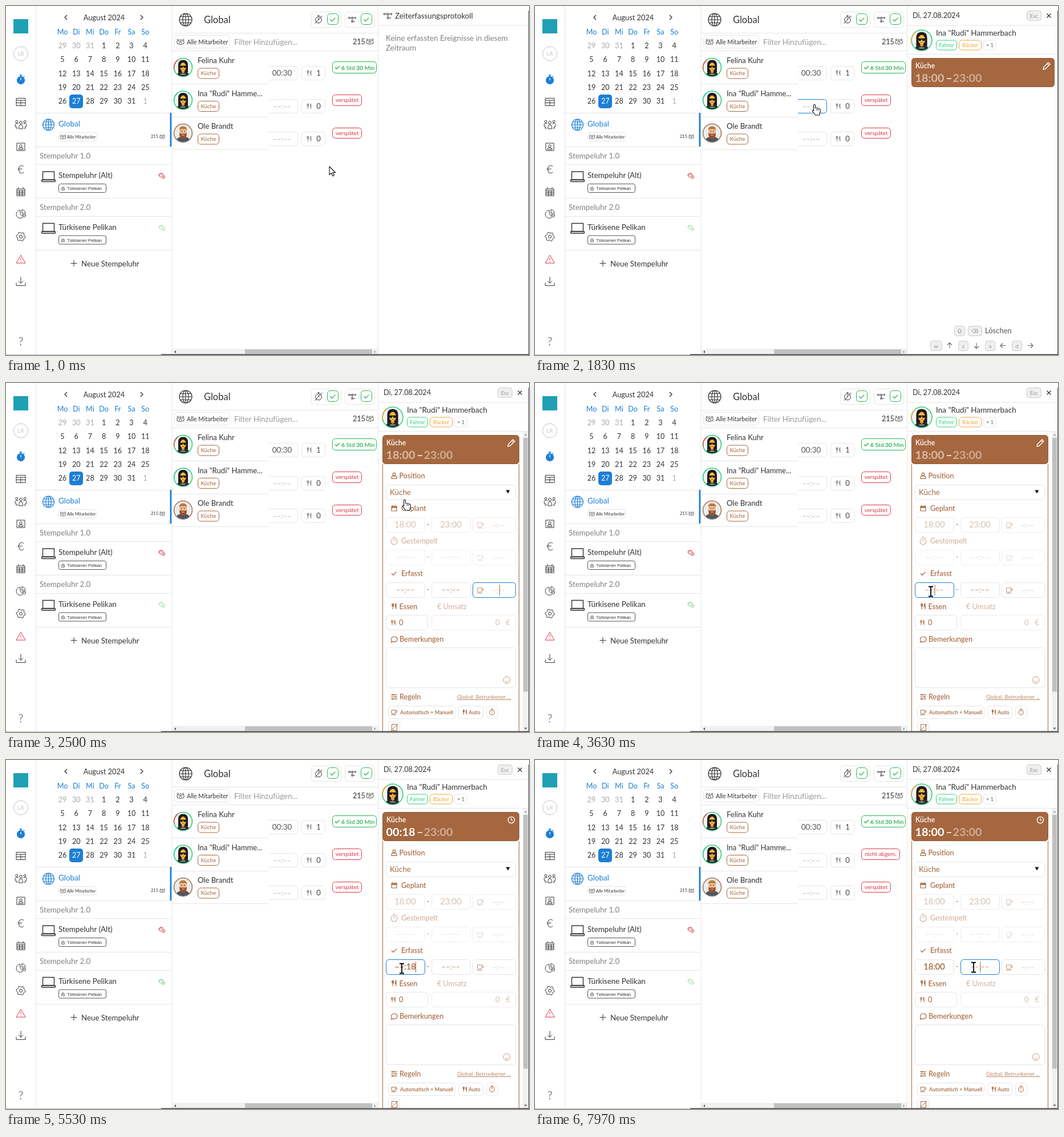
An HTML page for the animation above (8 s loop, 917 by 611 pixels).

```html
<!DOCTYPE html>
<html lang="de">
<head>
<meta charset="utf-8">
<title>Zeiterfassung</title>
<style>
html, body { margin: 0; width: 100%; height: 100%; overflow: hidden; background: #fff; }
svg { display: block; }
text { font-family: Lato, "Open Sans", sans-serif; white-space: pre; }
.arial { font-family: "Liberation Sans", Arial, sans-serif; }
</style>
</head>
<body>
<svg id="stage" width="917" height="611" viewBox="0 0 917 611"><g id="base"></g><g id="live"></g></svg>
<script>
const INK = '#333', GRAY = '#808080', LINE = '#e6e6e6', BLUE = '#1c7fd6', RED = '#dc3545',
      GREEN = '#28b351', BROWN = '#a5673f', PALE = '#d9c1b1', SOFT = '#f0ece9';

// drawing helpers, all returning SVG markup
const text = (x, y, s, size = 13.3, fill = INK, anchor = 'start', weight = 400, extra = '') =>
  `<text x="${x}" y="${y}" font-size="${size}" fill="${fill}" text-anchor="${anchor}" font-weight="${weight}" ${extra}>${s}</text>`;
const mid = (x, y, s, size, fill, weight) => text(x, y, s, size, fill, 'middle', weight);
const box = (x, y, w, h, r = 5, stroke = LINE, fill = 'none') =>
  `<rect x="${x + .5}" y="${y + .5}" width="${w - 1}" height="${h - 1}" rx="${r}" stroke="${stroke}" fill="${fill}"/>`;
const fillBox = (x, y, w, h, fill, r = 0) => `<rect x="${x}" y="${y}" width="${w}" height="${h}" rx="${r}" fill="${fill}"/>`;
const hline = (x, y, w) => fillBox(x, y, w, 1, LINE);
const path = (d, stroke = INK, w = 1, fill = 'none') =>
  `<path d="${d}" stroke="${stroke}" stroke-width="${w}" fill="${fill}" stroke-linejoin="round" vector-effect="non-scaling-stroke"/>`;
const shape = (d, fill) => `<path d="${d}" fill="${fill}"/>`;
const at = (x, y, s, inner) => `<g transform="translate(${x} ${y}) scale(${s})">${inner}</g>`;
const fade = (o, inner) => `<g opacity="${o}">${inner}</g>`;
const ring = (x, y, r, ry = r) => `M${x - r} ${y}a${r} ${ry} 0 1 0 ${2 * r} 0a${r} ${ry} 0 1 0 ${-2 * r} 0`;

const gear = 'M' + [...Array(24)].map((_, i) => {
  const a = i * Math.PI / 12, r = i % 4 < 2 ? 8 : 6.2;
  return (r * Math.cos(a)).toFixed(1) + ' ' + (r * Math.sin(a)).toFixed(1);
}).join('L') + 'z';
const watch = ring(0, 1, 6) + 'M0 1v-3.5M-2-7.5h4M0-7.5v2.5M4.5-4.5l1.5-1.5';
const icons = {
  gear: gear + ring(0, 0, 2.6), watch, noWatch: watch + 'M-7 8L7-7',
  people: ring(0, -3, 2.2) + 'M-2.8 7v-4q0-2.5 2.8-2.5t2.8 2.5v4z' + ring(-6.5, -4.5, 1.8) + ring(6.5, -4.5, 1.8) +
    'M-4-1q-5-2.5-5 2v2h1.5v3h3M4-1q5-2.5 5 2v2h-1.5v3h-3',
  table: 'M-8-6.5h16v13h-16zM-8-3h16M-8 1.5h16M0-3v9.5',
  card: 'M-7-6.5h14v13h-14z' + ring(0, -1.5, 2.2) + 'M-4 4.5q0-3.3 4-3.3t4 3.3z',
  calendar: 'M-7-5h14v12h-14zM-7-2h14M-7 1h14M-7 4h14M-2.5-2v9M2.5-2v9M-4-8v3M4-8v3',
  day: 'M-5-4h10v9h-10zM-5-2.5h10M-5-1.5h10M-3-6v2M3-6v2',
  pie: 'M-1-7a7 7 0 1 0 5 12L-1 0zM2-8a6.5 6.5 0 0 1 6 6.5h-6zM2.5 1h6q0 3-2 4.5z',
  warn: 'M0-7L8 7h-16zM0-2v4M0 4v1.2',
  load: 'M0-8v11M-4-1l4 4 4-4M-8 2v5h16v-5',
  globe: ring(0, 0, 10) + ring(0, 0, 4.6, 10) + 'M-10 0h20M-8.5-5h17M-8.5 5h17M0-10v20',
  fork: 'M-4-5.5v3.5q0 2 1.5 2t1.5-2v-3.5M-2.5-5.5v11M4 5.5v-11q-2 1-2 6.5h2',
  cup: 'M-5-4h9v5q0 3-3 3h-3q-3 0-3-3zM4-3h1.5q1.5 0 1.5 2t-1.5 2h-1.5M-6 6h11',
  pencil: 'M-6 6l1-4 8-8 3 3-8 8zM1-4l3 3',
  clock: ring(0, 0, 5.6) + 'M0-3.5v3.5l2.5 1.5',
  user: ring(0, -3, 2.6) + 'M-5 5.5v-1q0-4 3-4h4q3 0 3 4v1z',
  check: 'M-5 0l3.3 3.3 6.5-6.5',
  chat: 'M-6 6l1.5-3a6 5 0 1 1 3 1.8z',
  sliders: 'M-6-4h12M-6 0h12M-6 4h12M-2-6v4M3-2v4M-3 2v4',
  flow: ring(-6, -3, 1.5) + ring(0, -3, 1.5) + ring(0, 4, 1.5) + 'M-4.5-3h3M1.5-3h6M5.5-5l2 2-2 2M0-1.5v4M1.5 4h4',
  plug: 'M-6-1h2M-4-3v3q0 2.5 2.5 2.5h1M-4-3h6v2M-2.5-5v2M.5-5v2' + ring(3, 2.3, 2.6) + 'M3 1v1.5h1',
  laptop: 'M-10-9h20v14h-20zM-12 5.5h24v1.5q0 1.5-2 1.5h-20q-2 0-2-1.5z',
  smile: ring(0, 0, 6) + 'M-3 1.5q3 3.5 6 0M-2-2.5v1M2-2.5v1',
  house: 'M-6 0l6-5 6 5M-4 0v5h8v-5' + ring(0, 0, 1.6),
  off: 'M-5-6h10v12h-10zM-7 7L7-7',
  cross: 'M-3.5-3.5l7 7M3.5-3.5l-7 7',
  arrow: 'M0 4.5v-9M-4-1l4-4 4 4',
  shift: 'M0-4.5l4 4.5h-2v4h-4v-4h-2z',
  erase: 'M-6 0l3-3.5h9v7h-9zM0-1.5l3 3M3-1.5l-3 3'
};
const icon = (name, x, y, color, s = 1, w = 1, fill) => at(x, y, s, path(icons[name], color, w, fill));

// pill with a centred label
const pill = (x, y, w, h, s, color, size = 9.9, border = color) =>
  box(x, y, w, h, 5, border, '#fff') + mid(x + w / 2, y + h / 2 + size * .35, s, size, color);

const woman = (x, y, r, edge) => at(x, y, r / 16,
  path(ring(0, 0, 16), '#2fd07c', 1.6, '#f6f6f6') +
  path('M-15.5 4A16 16 0 0 1-9-13', edge, 1.6) +
  shape('M-8.5 9V-4Q-8.5-13 0-13T8.5-4V9z', '#1d1b1c') +
  shape('M-10 12q1.5-4 5.5-4h9q4 0 5.5 4a16 16 0 0 1-20 0z', '#2b2b2e') +
  shape('M-2.5 4h5v4.5l-2.5 2-2.5-2z', '#e39b2f') +
  shape(ring(0, -1, 5.4, 7.5), '#f7b63e') +
  shape('M-5.5-4Q-3-8 0-9.500Q3-8 5.500-4V-9L0-12L-5.500-9z', '#1d1b1c') +
  shape('M-6-3h12v1q-.5 3-3 3t-2.500-2.500h-1q0 2.500-2.500 2.500t-3-3z', '#161616') +
  path('M-1.5 3.5h3', '#b4482f') + path('M-4 12h8', '#ddd', 1.2));
const man = (x, y) => at(x, y, 1,
  path(ring(0, 0, 16), '#a5704f', 1.5, '#ececec') +
  shape('M-11 11q2-4 7-4h8q5 0 7 4a16 16 0 0 1-22 0z', '#45596b') +
  shape(ring(0, -2, 6, 8), '#efb98f') +
  shape('M-6.5-4q-1-8 6.5-8t6.5 8l-2-3h-9z', '#b8793a') +
  shape('M-6.3-1l1.5 2h9.6l1.5-2q1 11-6.3 11t-6.3-11z', '#9c4f2a') +
  path('M-2 3.5h4', '#f3d9c6') + path('M-3.5-3h2M1.5-3h2'));

function sidebar() {
  return fillBox(13, 23, 26, 25, '#1fa0b5') +
    path(ring(26, 83.5, 12.5), '#c4c4c4') + mid(26, 87, 'LR', 9.5, '#c4c4c4') +
    icon('watch', 26, 129, BLUE, 1.05, 1.6, BLUE) + path('M26 130v-4', '#fff', 1.3) +
    ['table', 'people', 'card', , 'calendar', 'pie', 'gear', 'warn', 'load'].map((n, i) =>
      icon(n, 26, 168 + i * 39.3, n === 'warn' ? RED : INK, n === 'people' ? 1.1 : 1)).join('') +
    mid(26, 293, '€', 20, INK, 300) + mid(26, 594, '?', 20, INK, 300) + fillBox(52, 0, 1, 609, LINE);
}

function calendar() {
  let s = path('M107 16l-4 4 4 4M236 16l4 4-4 4', INK, 1.4) + mid(172, 25, 'August 2024', 12.8) +
    fillBox(111, 155, 24, 24, BLUE, 5);
  for (let i = 0; i < 42; i++) {
    const x = 99 + i % 7 * 24.2, y = 50 + Math.floor(i / 7) * 24.2, d = i - 9;
    if (i < 7) s += mid(x, y, ['Mo', 'Di', 'Mi', 'Do', 'Fr', 'Sa', 'So'][i], 12.6, BLUE);
    else {
      const out = d < 1 || d > 31;
      s += mid(x, y, d < 1 ? d + 31 : d > 31 ? d - 31 : d, 12.6, d === 27 ? '#fff' : out ? '#aaa' : INK);
    }
  }
  return s;
}

function clocks() {
  const device = (y, name) => icon('laptop', 74.5, y + 2, INK, 1, 1.4) + text(92, y + 4, name, 13.4) +
    box(92, y + 14, 84, 16, 3, '#555') + icon('house', 100, y + 22.5, INK, .6, .7) +
    text(107, y + 25, 'Türkisener Pelikan', 7.4, INK, 'start', 400, 'class="arial"');
  return [187, 246, 277, 336, 368, 427].map(y => hline(53, y, 237)).join('') +
    icon('globe', 74.5, 208, BLUE, 1, 1.2) + text(92, 211, 'Global', 13.4, BLUE) +
    fillBox(287.5, 187, 3, 59, BLUE) + box(92, 221, 67, 16, 4) + icon('people', 100, 229, INK, .55, .6) +
    text(107, 231.5, 'Alle Mitarbeiter', 7.3) + text(254, 231, '215', 7.5) + icon('people', 274, 228.5, INK, .5, .6) +
    text(59, 267, 'Stempeluhr 1.0', 13.4, GRAY) + device(297, 'Stempeluhr (Alt)') +
    icon('plug', 273, 297, RED) +
    text(59, 357, 'Stempeluhr 2.0', 13.4, GRAY) + device(387.5, 'Türkisene Pelikan') +
    path('M113.5 450.5h11M119 445v11') + text(132, 455.5, 'Neue Stempeluhr') + fillBox(290.5, 0, 1, 609, LINE);
}

function staff() {
  const toggle = (x, name) => box(x, 10, 53, 28) + icon(name, x + 13, 23.5, INK, .9) +
    box(x + 28, 13, 20, 20, 5, GREEN) + icon('check', x + 38, 23.5, GREEN, .9, 1.3);
  return icon('globe', 315, 24, INK, 1.1, 1.2) + text(347, 30, 'Global', 16.5) +
    toggle(535, 'noWatch') + toggle(594, 'flow') + hline(291, 47, 361) + hline(291, 78, 361) +
    box(295, 51, 98, 23) + icon('people', 306, 62.5, INK, .7, .8) + text(317, 66.5, 'Alle Mitarbeiter', 10.5) +
    text(400, 67.5, 'Filter Hinzufügen...', 13.4, '#999') + text(608, 66.5, '215', 12.6) + icon('people', 638, 62, INK, .7, .8) +
    ['Felina Kuhr', 'Ina "Rudi" Hamme...', 'Ole Brandt'].map((name, i) => {
      const y = i * 57.5;
      return text(336, 100 + y, name, 13.1) + pill(336, 108.5 + y, 38, 19, 'Küche', BROWN, 9.8) + hline(291, Math.round(136 + y), 170);
    }).join('') +
    woman(310.5, 107.5, 16, '#e2574c') + woman(310.5, 165, 16, '#2fd0b0') + man(310.5, 222.5) +
    box(572, 97, 78, 21, 5, GREEN) + icon('check', 581, 107.5, GREEN, .8, 1.4) +
    text(588, 111.5, '<tspan font-weight="700">6</tspan> Std <tspan font-weight="700">30</tspan> Min', 10.3, GREEN, 'start', 600) +
    pill(572, 213, 52, 19, 'verspätet', RED) +
    fillBox(291, 600, 361, 10, '#f1f1f1') + fillBox(419, 601, 223, 8, '#c1c1c1') +
    shape('M298 603v5l-3-2.5z', '#505050') + shape('M645.5 603v5l3-2.5z', '#a0a0a0') +
    fillBox(652, 0, 1, 609, LINE) + hline(653, 33.5, 263);
}

const log = icon('flow', 669.5, 17, INK) + text(682, 21.5, 'Zeiterfassungsprotokoll') +
  text(666, 60.5, 'Keine erfassten Ereignisse in diesem', 13.5, GRAY) + text(666, 78, 'Zeitraum', 13.5, GRAY);

const key = (x, y, w, s) => box(x, y, w, 18, 4, '#ccc', '#f0f0f0') + (s ? mid(x + w / 2, y + 12.5, s, 10, '#999') : '');
const head = text(662, 21, 'Di, 27.08.2024', 12.6) + key(862, 8, 26, 'Esc') + icon('cross', 901, 17, INK, 1, 1.4) +
  woman(678, 60, 18, '#e8a33a') + text(703, 52, 'Ina "Rudi" Hammerbach', 13.5) +
  pill(703, 59.5, 37, 18, 'Fahrer', '#2fd07c', 9.5) + pill(743, 59.5, 40, 18, 'Bäcker', '#f0a73c', 9.5) +
  pill(786, 59.5, 23, 18, '+ 1', '#666', 9, LINE) + hline(653, 84, 263);

const turn = (x, deg) => `<g transform="translate(${x} 594.5) rotate(${deg})">${path(icons.arrow, '#666', 1.1)}</g>`;
const footer = key(735, 560, 19) + icon('shift', 744.5, 569, '#999', .9) + key(759, 560, 25) + icon('erase', 771, 569, '#999', .8) +
  text(789, 572.5, 'Löschen', 13, '#555') + key(693, 586, 21, 'w') + turn(727, 0) + key(742, 586, 18, 's') + turn(774, 180) +
  key(789, 586, 18, 'a') + turn(821, 270) + key(836, 586, 18, 'd') + turn(868, 90);

const label = (y, name, s, x = 693) => icon(name, 680.5, y - 4.5, BROWN, .9, 1.2) + text(x, y, s, 12.6, BROWN, 'start', 500);
const EMPTY = '––:––';
const time = (x, y, s, color) => mid(x, y + 18, s, s === EMPTY ? 12.8 : 14.6, color);
const times = (y, a, b, color, border) => box(666, y, 69, 27, 5, border) + box(746, y, 69, 27, 5, border) + box(818, y, 76, 27, 5, border) +
  time(700, y, a, color) + time(780, y, b, color) +
  mid(740, y + 17, '-', 13, BROWN) + icon('cup', 831, y + 13.5, color, .9) + mid(864, y + 17.5, '–:––', 11.6, PALE);

const form = path('M660.5 142v480M899.5 142v480', BROWN) +
  label(167, 'user', 'Position', 689.5) + box(666, 178, 228, 27) + text(673, 196, 'Küche', 13.4, BROWN) +
  shape('M876.5 187.5h7l-3.5 6z', '#111') +
  label(224, 'day', 'Geplant') + times(235, '18:00', '23:00', PALE, SOFT) +
  fade(.5, label(281, 'watch', 'Gestempelt')) + fade(.6, times(292, EMPTY, EMPTY, PALE, LINE)) +
  label(338, 'check', 'Erfasst') +
  label(395.5, 'fork', 'Essen', 689.5) + fade(.5, text(756, 395.5, '€ Umsatz', 12.6, BROWN)) +
  box(666, 406, 74, 27) + icon('fork', 679, 419.5, BROWN, .8) + text(689, 424, '0', 13, BROWN) +
  box(746, 406, 148, 27, 5, SOFT) + mid(862, 424, '0', 13.5, PALE) + mid(880, 424, '€', 12.5, PALE) +
  label(453, 'chat', 'Bemerkungen', 690) + box(666, 463, 228, 71) + icon('smile', 878, 520, '#c39a80') +
  label(554, 'sliders', 'Regeln', 690) +
  text(791, 553, 'Global: Betrunkener ...', 9.7, '#bb8a6b', 'start', 400, 'text-decoration="underline"') +
  box(670, 565, 118, 23) + icon('cup', 680, 576, BROWN, .8) + text(691, 580, 'Automatisch + Manuell', 9.1, BROWN, 'start', 600) +
  box(793, 565, 44, 23) + icon('fork', 804.5, 576.5, BROWN, .8) + text(811, 580, 'Auto', 9.5, BROWN, 'start', 600) +
  box(842, 565, 21, 23) + icon('watch', 852, 576, BROWN, .72) +
  box(670, 592, 21, 24) + icon('off', 681, 603, BROWN, .9);

// timeline in ms
const OPEN = 1560, EXPAND = 1900, BREAK = 2170, START = 3330, END = 7500, KEYS = [4700, 5150, 5650, 6030];
const mouse = [[500, 567, 281], [1000, 527, 180], [1200, 527, 180], [1480, 490, 172], [2150, 490, 172], [2450, 699, 204],
  [2600, 699, 204], [2930, 694, 365], [6550, 694, 365], [7250, 769, 363]];

function pointer(t) {
  const i = mouse.findIndex(m => m[0] > t);
  if (i === 0) return mouse[0].slice(1);
  if (i < 0) return mouse.at(-1).slice(1);
  const [a, x, y] = mouse[i - 1], [b, u, v] = mouse[i], p = (t - a) / (b - a), e = p * p * (3 - 2 * p);
  return [x + (u - x) * e, y + (v - y) * e];
}

function cursor(x, y) {
  if (y > 340) return at(x, y, 1, path('M-4-8.5h3l1 1 1-1h3M-4 8.5h3l1-1 1 1h3M0-7.5v15', '#000', 1.8));
  const hand = x < 560 && y < 190 || x > 666 && y < 208;
  return at(x, y, 1, hand
    ? path('M-1.5 1.5q1.5-3 3 0v5q6 .5 8 2 1.2 1 .5 5l-1.5 5.5h-7l-5-7q-.5-2 1.5-1.3l.5.8z', '#111', 1.1, '#fff') + path('M4 8v3M6.5 8.5v3')
    : path('M0 0v14.5l3.5-3.2 2.3 5.4 2.5-1.1-2.3-5.1h4.5z', '#111', 1.1, '#fff'));
}

function detail(t) {
  const p = Math.min(1, Math.max(0, (t - EXPAND) / 350)), h = 478 * (1 - (1 - p) ** 2);
  const over = Math.max(0, h - 406), right = over ? 900 : 911;
  const n = KEYS.filter(k => k <= t).length, typed = '1800'.slice(0, n);
  const clock = c => typed.padStart(4, c).replace(/^../, '$&:');
  const set = n > 0 && n !== 3;
  let s = head + `<g transform="translate(0 ${over})">${footer}</g>`;
  if (h) s += `<svg x="653" y="142" width="263" height="${h}" viewBox="653 142 263 ${h}">${form + recorded(t, n, clock('–'))}</svg>`;
  s += box(660, 91, right - 660, 51, 5, '#975a33', BROWN) + text(667, 109, 'Küche', 12.3, '#fff', 'start', 600) +
    text(666.5, 133, set ? clock('0') : '18:00', 19.8, set ? '#fff' : '#d8b9a5', 'start', 700) +
    fillBox(722, 126, 8, 2, '#ead8cc') + text(732.5, 133, '23:00', 19.8, '#d0ab94', 'start', 700) +
    icon(set ? 'clock' : 'pencil', right - 14, 105, '#fff', 1, 1.4);
  if (over) s += fillBox(906, 85, 10, 525, '#f1f1f1') + fillBox(907, 96, 8, 505 * 527 / (527 + over), '#c1c1c1') +
    shape('M908.5 92h5l-2.5-3z', '#a0a0a0') + shape('M908.5 603.5h5l-2.5 3z', '#505050');
  return s;
}

function recorded(t, n, value) {
  let s = times(349, n ? value : EMPTY, EMPTY, '#c08f72', LINE);
  if (n) s += time(700, 349, value, BROWN);
  if (t < BREAK) return s;
  const [x, w, caret] = t < START ? [818, 76, 865] : t < END ? [666, 69, n ? 718 : 700.5] : [746, 69, 780.5];
  const last = Math.max(...[BREAK, START, ...KEYS, END].filter(e => e <= t));
  s += box(x, 349, w, 27, 5, BLUE);
  return (t - last) % 1000 < 500 ? s + fillBox(caret, 353, 1, 19, BROWN) : s;
}

// quick glow, slow fade, once every two seconds
function glow(t) {
  const u = (t + 1585) / 2000 % 1;
  return .45 + .55 * Math.sin(Math.PI * u ** .7) ** 6;
}

function scene(t) {
  const [x, y] = pointer(t);
  let s = fade(glow(t), icon('plug', 273, 388, '#22b14c'));
  for (let i = 0; i < 3; i++) {
    const top = Math.round(105 + i * 57.5), hover = i === 1 && x > 518 && x < 560 && y > 163 && y < 189;
    const focus = i === 1 && t >= OPEN && t < BREAK;
    s += `<svg x="461" y="${top}" width="52" height="26" viewBox="461 ${top} 52 26">${box(440, top, 72, 25, 5, focus ? BLUE : LINE)}</svg>` +
      mid(484, top + 17, i ? EMPTY : '00:30', i ? 12 : 13.5, i ? '#aaa' : '#555') +
      box(518, top, 42, 25, 5, hover ? '#d8d8d8' : LINE, hover ? '#ececec' : '#fff') +
      icon('fork', 531.5, top + 12.5, GRAY, .85) + mid(548, top + 17, i ? 0 : 1, 13, '#444');
  }
  s += t < END ? pill(572, 155, 52, 20, 'verspätet', RED) : pill(572, 155, 68, 20, 'nicht abgem.', RED);
  s += t < OPEN ? log : detail(t);
  s += fillBox(0, 610, 272, 1, '#bbb') + fillBox(272, 609.5, 645, 1.5, '#444') + fillBox(916, 8, 1, 603, '#555');
  return s + cursor(x, y);
}

const live = document.getElementById('live');
document.getElementById('base').innerHTML = sidebar() + calendar() + clocks() + staff();
const begin = performance.now();
function frame() {
  live.innerHTML = scene((performance.now() - begin) % 8000);
  requestAnimationFrame(frame);
}
frame();
</script>
</body>
</html>
```
